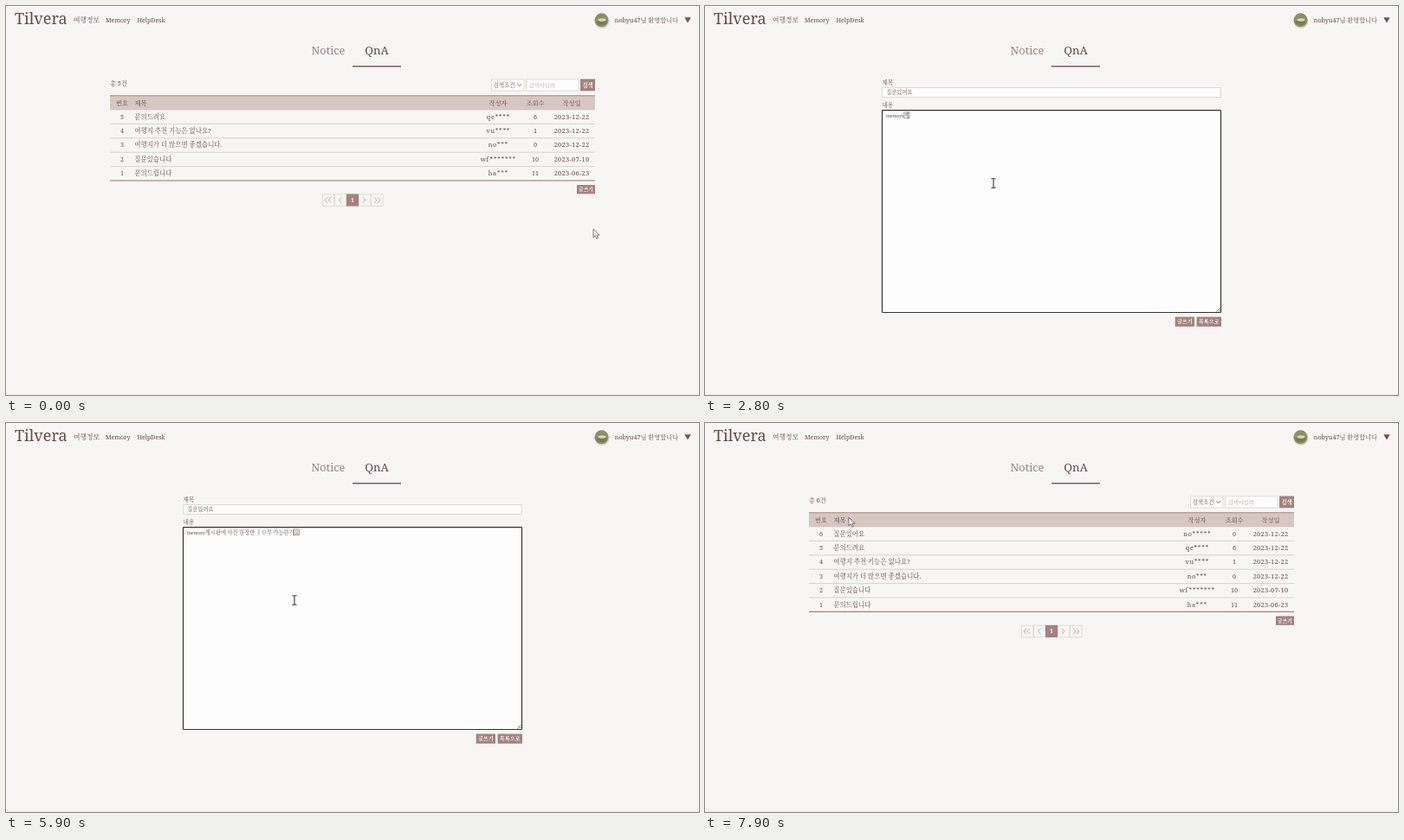
Recreate the animation shown at these times as an HTML page. Size 800x450 px, loop 8000 ms.

```html
<!DOCTYPE html>
<html lang="ko">
<head>
<meta charset="utf-8">
<title>QnA</title>
<style>
html, body { margin: 0; width: 100%; height: 100%; overflow: hidden; background: #f8f6f4; }
svg { display: block; width: 800px; height: 450px; }
text { font: 7.8px "Noto Serif", "Noto Serif CJK KR", "Noto Sans CJK KR", serif; fill: #65494a; white-space: pre; }
.mid { text-anchor: middle; }
.end { text-anchor: end; }
.typed { font-family: "Liberation Serif", "Noto Serif CJK KR", "Noto Sans CJK KR", serif; font-size: 6.25px; }
.date { letter-spacing: .25px; }
.user { letter-spacing: .75px; }
.light { fill: #fff; }
.firm { font-weight: 500; }
.bold { font-weight: 700; }
.btn { fill: #a4827e; }
.field { fill: #fefdfd; stroke: #dfdad4; }
.focus { stroke: #333; stroke-width: 1.2; }
.line { stroke: #d3cac6; stroke-width: .8; }
.strong { stroke: #a48581; stroke-width: 1.1; }
.thin { fill: none; stroke: #a99692; stroke-width: .8; }
.cell { fill: none; stroke: #ddd7d3; stroke-width: .9; }
.compose { fill: none; stroke: #6f5150; stroke-width: .5; }
</style>
</head>
<body>
<svg id="stage" viewBox="0 0 800 450" xmlns="http://www.w3.org/2000/svg"></svg>
<script>
const ROW = 16.4, LOOP = 8000, STEP = 100;
const stage = document.getElementById('stage');
const $ = id => document.getElementById(id);

const text = (x, y, s, size, cls = '', more = '') =>
  `<text x="${x}" y="${y}" class="${cls}" ${more} style="font-size:${size}px">${s}</text>`;
const rect = (x, y, w, h, cls, more = '') =>
  `<rect x="${x}" y="${y}" width="${w}" height="${h}" class="${cls}" ${more}/>`;
const rule = (y, cls) => `<path d="M120 ${y}H680" class="${cls}"/>`;
const path = (d, cls, more = '') => `<path d="${d}" class="${cls}" ${more}/>`;
const button = (x, y, w, h, s, size) =>
  rect(x, y, w, h, 'btn') + text(x + w / 2, y + h / 2 + size * .36, s, size, 'mid light bold');

function row(i, no, title, user, views, date) {
  const y = 130.6 + ROW * i;
  return text(134, y, no, 7.2, 'mid') + text(148.3, y, title, 7.45, 'firm') +
    text(568.3, y, user, 7.2, 'mid user') + text(611, y, views, 7.2, 'mid') +
    text(653, y, date, 7.5, 'mid date') + rule(120 + ROW * (i + 1), 'line');
}

const header = `
  ${text(10, 21, 'Tilvera', 18)}
  ${text(78, 18.8, '여행정보', 7.75, 'firm')}${text(115, 18.5, 'Memory', 7.05)}${text(151.5, 18.5, 'HelpDesk', 7.05)}
  <circle cx="688" cy="17.5" r="8.6" fill="#d8d6cf"/>
  <circle cx="687.5" cy="16.3" r="8" fill="#8b9062"/>
  <ellipse cx="687.5" cy="19" rx="6" ry="3" fill="#757e52"/>
  <ellipse cx="688" cy="16" rx="4.5" ry="1.8" fill="#d5d8bd"/>
  ${text(776, 18.8, 'nobyu47님 환영합니다', 7.2, 'end firm')}
  <path d="M783.3 13.2h7.4l-3.7 6.4z" fill="#7b4f50"/>
  ${text(372, 55.5, 'Notice', 12.8, 'mid', 'opacity=".65"')}${text(428, 55.5, 'QnA', 13.2, 'mid')}
  ${rect(400, 69, 56, 1.6, '', 'fill="#8a6567"')}
  ${rect(0, 449, 800, 1, '', 'fill="#efebdc"')}`;

const arrows = [[372.5, -1], [368.5, -1], [385, -1], [412.5, 1], [425.5, 1], [429.5, 1]]
  .map(([x, d]) => path(`M${x - d * 1.5 + 1} 221.3l${d * 3} 3.3l${-d * 3} 3.3`, 'thin')).join('');

const list = `
  <g id="list">
    ${text(120, 91.5, '', 7.2, '', 'id="count"')}
    ${rect(560.5, 84.8, 37.5, 13.2, 'field')}${text(562.5, 93.8, '검색조건', 6.5, 'firm')}
    ${path('M590.3 90.3l2.2 2.2l2.2 -2.2', 'thin', 'style="stroke:#554442"')}
    ${rect(600.5, 84.8, 60.5, 13.2, 'field')}${text(603.5, 93.8, '검색어입력', 6.2, '', 'opacity=".5"')}
    ${button(663, 84.5, 17, 13.8, '검색', 6.3)}
    ${rect(120, 104, 560, 16, '', 'fill="#d6c7c3"')}
    ${rule(103.7, 'strong')}${rule(120, 'line')}
    ${text(134, 114.5, '번호', 7.3, 'mid firm')}${text(148.5, 114.5, '제목', 7.3, 'firm')}
    ${text(568, 114.5, '작성자', 7.3, 'mid firm')}${text(611, 114.5, '조회수', 7.3, 'mid firm')}${text(653, 114.5, '작성일', 7.3, 'mid firm')}
    <g id="fresh">${row(0, 6, '질문있어요', 'no*****', 0, '2023-12-22')}</g>
    <g id="rest">
      ${row(0, 5, '문의드려요', 'qe****', 6, '2023-12-22')}
      ${row(1, 4, '여행지 추천 기능은 없나요?', 'vu****', 1, '2023-12-22')}
      ${row(2, 3, '여행지가 더 많으면 좋겠습니다.', 'no***', 0, '2023-12-22')}
      ${row(3, 2, '질문있습니다', 'wf*******', 10, '2023-07-10')}
      ${row(4, 1, '문의드립니다', 'ha***', 11, '2023-06-23')}
      ${rule(202, 'strong')}
      ${button(659, 207, 21, 10.4, '글쓰기', 5.8)}
      ${[365, 379, 407, 421].map(x => rect(x + .3, 217.8, 13.7, 13.6, 'cell')).join('')}
      ${arrows}${button(393, 217.4, 14, 14.2, '1', 7)}
    </g>
  </g>`;

const form = `
  <g id="form">
    ${text(204.5, 90.9, '제목', 6.6, 'firm')}${rect(204.5, 94.5, 391, 11, 'field')}
    ${text(204.5, 117.2, '내용', 6.6, 'firm')}${rect(204.5, 120.6, 391, 233.9, 'field', 'id="area" rx=".8"')}
    ${path('M590.5 353.5l4 -4M593 353.5l1.5 -1.5', 'thin', 'style="stroke:#555"')}
    <text id="title" class="typed" x="209.3" y="102.3"></text>
    <text id="body" class="typed" x="209" y="128.6"></text>
    <rect id="compose" class="compose"/>
    ${button(542.7, 359.6, 22.3, 11.2, '글쓰기', 6.2)}${button(567.6, 359.6, 28.4, 11.2, '목록으로', 6.2)}
  </g>`;

const pointers = `
  <g id="pointer">
    <path id="arrow" d="M0 0v9.8l2.3 -2l1.5 3.4l1.6 -.7l-1.5 -3.3h3.2z" fill="#fff" stroke="#444" stroke-width=".7"/>
    <path id="beam" d="M-2.6 -5.2h2l.6 .5l.6 -.5h2M0 -4.7v9.4M-2.6 5.2h2l.6 -.5l.6 .5h2" fill="none" stroke="#333" stroke-width="1.1"/>
    <path id="hand" d="M-.9 .8q.9 -1.6 1.8 0v3.6q1 -.7 1.7 .2q1 -.5 1.6 .4q1.2 -.3 1.5 .8v2.6q0 1.6 -1.2 3.4h-4.2q-1.2 -2 -3.4 -4.4q.2 -1.5 2.2 -.1z" fill="#fff" stroke="#444" stroke-width=".7"/>
  </g>`;

stage.innerHTML = header + list + form + pointers;

// Each entry: time in ms, then the state from there on.
const views = [[0, 'list'], [300, 'form'], [7200, 'list']];

const titleKeys = [[0, ''], [1000, '지'], [1100, '질무'], [1200, '질문이'], [1400, '질문있어'], [1500, '질문있어요']];

const board = 'memory게시판에 ', photo = board + '사진 ', one = photo + '한장만 ', ask = one + 'ㅓㅁ부 ';
const bodyKeys = [
  [0, ''], [2400, 'me'], [2500, 'memo'], [2600, 'memory'],
  [2800, 'memory게'], [2900, 'memory게시'], [3000, 'memory게시파'], [3100, 'memory게시판에'],
  [3200, board + '사'], [3300, board + '사지'], [3400, photo],
  [3600, photo + '하'], [3700, photo + '한'], [3800, photo + '한새'], [4100, photo + '한생'],
  [4200, photo + '한새'], [4300, photo + '한'], [4400, photo + '한자'], [4500, photo + '한장'],
  [4700, photo + '한장만'], [4800, one], [4900, one + 'ㅓ'], [5000, one + 'ㅓㅁ'],
  [5100, one + 'ㅓㅁ부'], [5200, ask], [5300, ask + '가'], [5400, ask + '가느'],
  [5600, ask + '가능'], [5700, ask + '가능하'], [5800, ask + '가능한가'],
  [5900, ask + '가능한가요'], [6000, ask + '가능한가요?']
];

// time, x, y, pointer shape
const track = [
  [0, 678, 258, 'arrow'], [100, 674, 230, 'arrow'], [200, 669, 212, 'hand'], [300, 655, 203, 'arrow'],
  [400, 603, 174, 'arrow'], [600, 470, 112, 'beam'], [800, 404, 100, 'beam'], [900, 400, 100, 'beam'],
  [1700, 400, 100, 'beam'], [1800, 334, 203, 'beam'], [2000, 333, 205, 'beam'],
  [6300, 333, 205, 'beam'], [6500, 350, 225, 'beam'], [6600, 430, 305, 'beam'],
  [6700, 520, 376, 'arrow'], [6800, 552, 387, 'arrow'], [6900, 560, 372, 'hand'],
  [7000, 560, 366.7, 'hand'], [7100, 559.5, 366, 'hand'], [7200, 535, 345, 'arrow'],
  [7300, 445, 266, 'arrow'], [7500, 280, 165, 'arrow'], [7700, 190, 118, 'arrow'], [7900, 166, 109, 'arrow']
];

const indexAt = (keys, t) => keys.findLastIndex(k => k[0] <= t);
const valueAt = (keys, t) => keys[indexAt(keys, t)][1];
const show = (id, on) => { $(id).style.display = on ? '' : 'none'; };

function drawPointer(t) {
  const i = indexAt(track, t), a = track[i], b = track[i + 1] || a;
  const p = b === a ? 0 : (t - a[0]) / (b[0] - a[0]);
  const x = a[1] + (b[1] - a[1]) * p, y = a[2] + (b[2] - a[2]) * p;
  $('pointer').setAttribute('transform', `translate(${x} ${y})`);
  for (const id of ['arrow', 'beam', 'hand']) show(id, id === a[3]);
}

// Outlines the syllable still being composed.
function drawCompose(el) {
  const s = el.textContent, on = /[ㄱ-힣]$/.test(s);
  show('compose', on);
  if (!on) return;
  const c = el.getExtentOfChar(s.length - 1), base = +el.getAttribute('y');
  const box = { x: c.x, y: base - 5.6, width: c.width, height: 6.9 };
  for (const k in box) $('compose').setAttribute(k, box[k]);
}

function draw(t) {
  const view = valueAt(views, t), added = t >= 7200;
  show('list', view === 'list');
  show('form', view === 'form');
  show('fresh', added);
  $('rest').setAttribute('transform', `translate(0 ${added ? ROW : 0})`);
  $('count').textContent = `총 ${added ? 6 : 5}건`;
  $('title').textContent = valueAt(titleKeys, t);
  $('body').textContent = valueAt(bodyKeys, t);
  $('area').classList.toggle('focus', t >= 1900 && t < 7000);
  if (view === 'form') drawCompose($(t < 1900 ? 'title' : 'body'));
  drawPointer(t);
}

const start = performance.now();
function tick() {
  const t = (performance.now() - start) % LOOP;
  draw(Math.floor(t / STEP) * STEP);
  requestAnimationFrame(tick);
}
tick();
</script>
</body>
</html>
```
